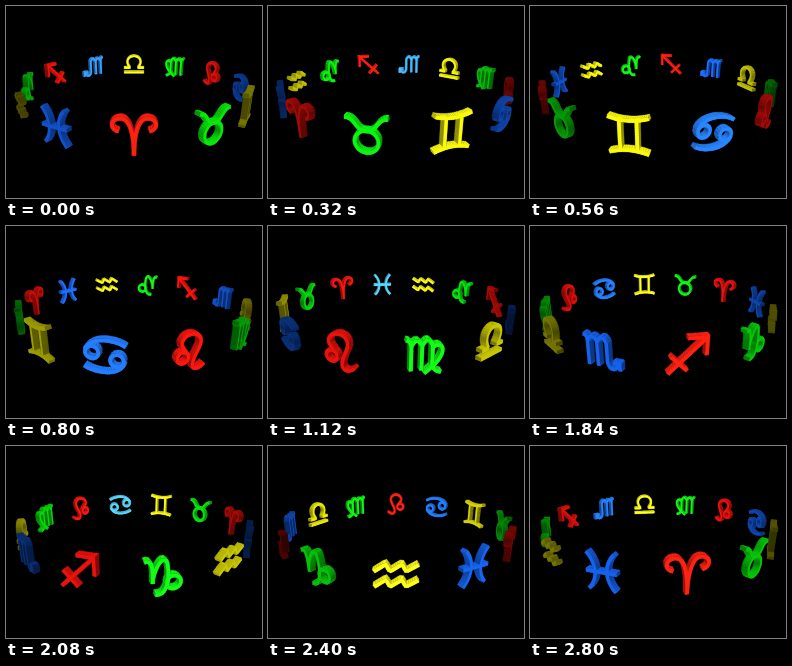
Animation of 256 by 192 pixels, one loop 2.88 s. Source, as an HTML page with a canvas:

```html
<!DOCTYPE html>
<html lang="en">
<head>
<meta charset="utf-8">
<title>Zodiac ring</title>
<style>
  html, body { margin: 0; width: 100%; height: 100%; overflow: hidden; background: #000; }
  canvas { display: block; }
</style>
</head>
<body>
<canvas width="256" height="192"></canvas>
<script>
const ctx = document.querySelector('canvas').getContext('2d');

// Each element has a base colour and the colour it takes when facing the light.
const FIRE = [[250, 20, 14], [255, 36, 18]];
const EARTH = [[10, 245, 14], [20, 255, 24]];
const AIR = [[250, 248, 8], [255, 255, 30]];
const WATER = [[24, 105, 255], [90, 220, 255]];

const ring = (x, y, r) => `M${x - r} ${y}a${r} ${r} 0 1 1 ${2 * r} 0a${r} ${r} 0 1 1 ${-2 * r} 0`;
const stems = 'M-20 -18Q-15 -18 -15 -11V16M-15 -11Q-9 -23 -4 -11V16M-4 -11Q2 -23 7 -11V9';

const SIGNS = [
  [FIRE, 'M-15 -6C-24 -8 -24 -20 -13 -20C-4 -20 0 -3 0 21M15 -6C24 -8 24 -20 13 -20C4 -20 0 -3 0 21'],
  [EARTH, ring(0, 7, 12.5) + 'M-22 -19C-10 -19 -12 -5 0 -5C12 -5 10 -19 22 -19'],
  [AIR, 'M-21 -20Q0 -13 21 -20M-21 20Q0 13 21 20M-9 -17V17M9 -17V17'],
  [WATER, ring(-13, -3, 7) + 'M-20 -6C-14 -20 10 -19 22 -11' + ring(13, 5, 7) + 'M20 8C14 22 -10 21 -22 13'],
  [FIRE, ring(-9, 5, 6.5) + 'M-5 1C-8 -6 -14 -9 -10 -15C-6 -23 10 -23 11 -11C11 -3 1 8 3 16C4 22 12 21 17 15'],
  [EARTH, stems + 'Q8 18 17 20M7 -8C14 -16 20 -8 16 1C13 9 5 15 -1 20'],
  [AIR, 'M-21 17H21M-21 7H-8C-20 -6 -12 -18 0 -18C12 -18 20 -6 8 7H21'],
  [WATER, stems + 'Q8 19 15 17L21 11M13 10H22M21 9V18'],
  [FIRE, 'M-20 19L19 -18M0 -19H22M20 -21V1M-17 0L0 17'],
  [EARTH, 'M-20 -16C-12 -20 -11 -6 -11 8M-11 3C-8 -14 0 -23 3 -14C5 -4 6 6 3 13C1 20 -3 22 -8 21' + ring(11, 8, 7.5)],
  [AIR, 'M-22 -6L-10 -14L-6 -6L6 -14L10 -6L22 -13M-22 11L-10 3L-6 11L6 3L10 11L22 4'],
  [WATER, 'M-16 -21C-4 -9 -4 9 -16 21M16 -21C4 -9 4 9 16 21M-18 0H18']
];

const UNIT = 169, RADIUS = 0.99, HALF_WIDTH = 2, HALF_DEPTH = 0.023;
const PITCH = 0.349, FOCAL = 277, DISTANCE = 2.575, SHIFT = -0.141;
const COS = Math.cos(PITCH), SIN = Math.sin(PITCH);
const CAMERA = [0, 0.748, 2.468], LIGHT = [0.25, 0, 2.468];

const dot = (a, b) => a[0] * b[0] + a[1] * b[1] + a[2] * b[2];
const sub = (a, b) => a.map((v, i) => v - b[i]);
const unit = a => { const n = Math.hypot(...a); return a.map(v => v / n); };

// Turn a stroke into flat quads (the caps) and outline edges (the side walls).
function buildGlyph(d) {
  const caps = [], edges = [];
  for (const stroke of d.split(/(?=M)/)) {
    const path = document.createElementNS('http://www.w3.org/2000/svg', 'path');
    path.setAttribute('d', stroke);
    const length = path.getTotalLength(), n = Math.ceil(length / 2.5);
    const pts = Array.from({ length: n + 1 }, (_, i) => path.getPointAtLength(length * i / n));
    const left = [], right = [];
    pts.forEach((p, i) => {
      const a = pts[Math.max(i - 1, 0)], b = pts[Math.min(i + 1, n)];
      const k = HALF_WIDTH / Math.hypot(b.x - a.x, b.y - a.y);
      const ox = (a.y - b.y) * k, oy = (b.x - a.x) * k;
      left.push([p.x + ox, p.y + oy]);
      right.push([p.x - ox, p.y - oy]);
    });
    for (let i = 0; i < n; i++) {
      caps.push([left[i], left[i + 1], right[i + 1], right[i]]);
      edges.push([left[i], left[i + 1]], [right[i + 1], right[i]]);
    }
    edges.push([right[0], left[0]], [left[n], right[n]]);
  }
  return { caps, edges };
}

const glyphs = SIGNS.map(([color, d]) => ({ color, ...buildGlyph(d) }));

const depth = p => DISTANCE - p[2] * COS - p[1] * SIN;
function project(p) {
  const s = FOCAL / depth(p);
  return [128 + p[0] * s, 96 + (p[2] * SIN - p[1] * COS + SHIFT) * s];
}

function addPolygon(points) {
  points.forEach((p, i) => ctx[i ? 'lineTo' : 'moveTo'](...project(p)));
  ctx.closePath();
}

// A whole sign is lit by how squarely it faces the light; walls vary only in strength.
function shade([base, lit], facing, strength) {
  const gloss = facing ** 16, level = Math.min(1, 0.32 + 0.8 * facing) * strength;
  return `rgb(${base.map((v, i) => Math.round((v + (lit[i] - v) * gloss) * level))})`;
}

function drawSign({ color, caps, edges }, angle) {
  const s = Math.sin(angle), c = Math.cos(angle);
  const place = ([u, v], out) => {
    const x = u / UNIT, r = RADIUS + out;
    return [x * c + r * s, -v / UNIT, r * c - x * s];
  };
  const normal = [s, 0, c];
  const facing = Math.abs(dot(normal, unit(sub(LIGHT, normal))));

  const walls = [];
  for (const [a, b] of edges) {
    const quad = [place(a, HALF_DEPTH), place(b, HALF_DEPTH), place(b, -HALF_DEPTH), place(a, -HALF_DEPTH)];
    const rise = Math.abs(b[0] - a[0]) / Math.hypot(b[0] - a[0], b[1] - a[1]);
    walls.push({ quad, rise, far: depth(quad[0]) + depth(quad[2]) });
  }
  walls.sort((a, b) => b.far - a.far);
  ctx.lineWidth = 0.3;
  for (const { quad, rise } of walls) {
    ctx.fillStyle = ctx.strokeStyle = shade(color, facing, 0.6 + 0.38 * rise);
    ctx.beginPath();
    addPolygon(quad);
    ctx.fill();
    ctx.stroke();
  }

  const side = dot(normal, sub(CAMERA, normal)) > 0 ? HALF_DEPTH : -HALF_DEPTH;
  ctx.fillStyle = shade(color, facing, 1);
  ctx.beginPath();
  for (const quad of caps) addPolygon(quad.map(p => place(p, side)));
  ctx.fill();
}

const STEP = 80, STEPS = 36;
let shown = -1;

function render(now) {
  const step = Math.floor(now / STEP) % STEPS;
  if (step !== shown) {
    shown = step;
    ctx.fillStyle = '#000';
    ctx.fillRect(0, 0, 256, 192);
    glyphs
      .map((glyph, i) => ({ glyph, angle: (i * 30 - step * 10) * Math.PI / 180 }))
      .sort((a, b) => Math.cos(a.angle) - Math.cos(b.angle))
      .forEach(({ glyph, angle }) => drawSign(glyph, angle));
  }
}

const start = performance.now();
function tick() {
  render(performance.now() - start);
  requestAnimationFrame(tick);
}
tick();
</script>
</body>
</html>
```
